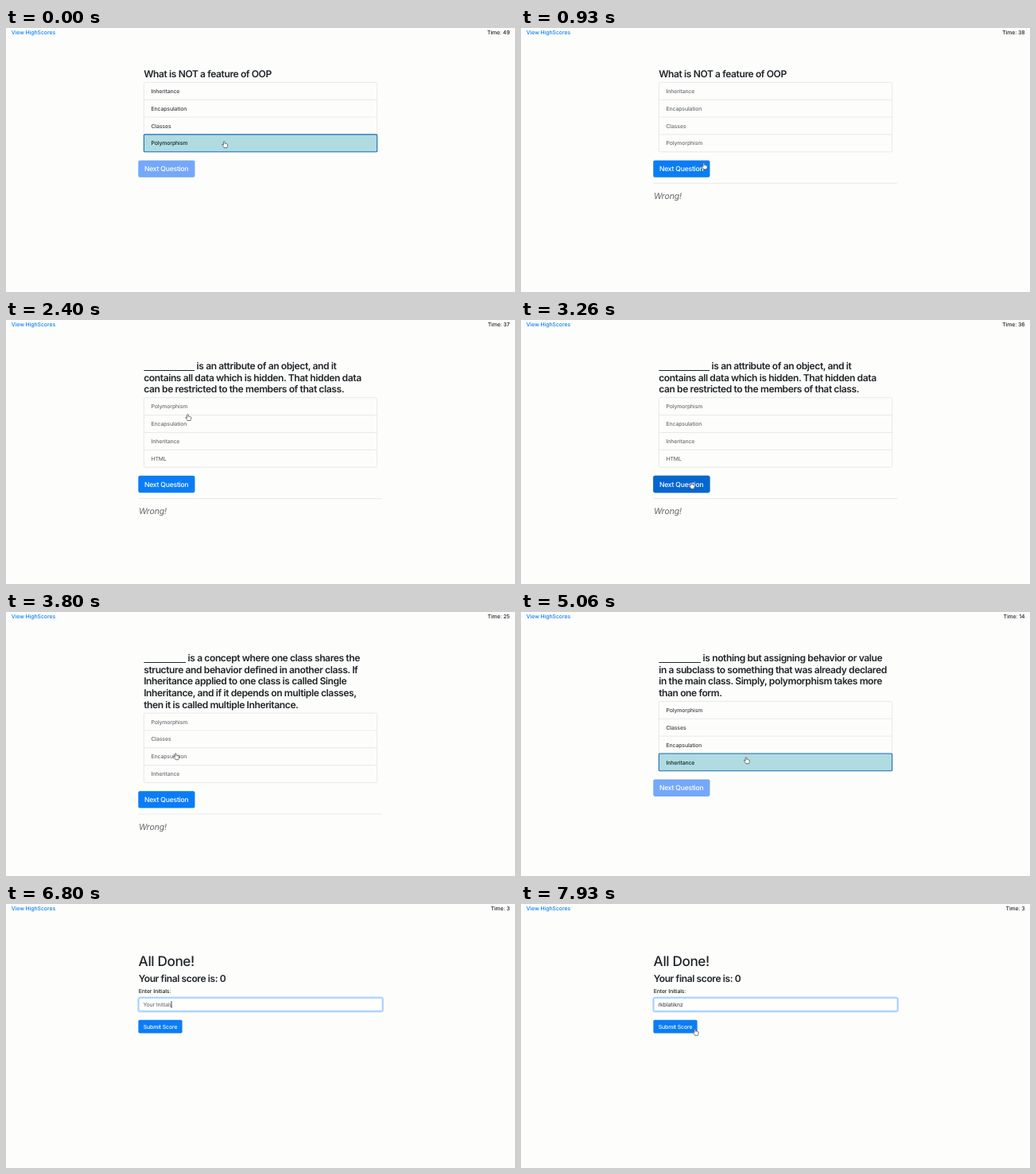
An HTML page for the animation above (8 s loop, 640 by 332 pixels).

```html
<!DOCTYPE html>
<html lang="en">
<head>
<meta charset="utf-8">
<title>Quiz</title>
<style>
  html, body { margin: 0; width: 100%; height: 100%; overflow: hidden; background: #fdfefc; }
  svg { display: block; width: 100vw; height: 100vh; }
  text {
    font: 500 6.9px Inter, Roboto, sans-serif; letter-spacing: -.016em; fill: #212529;
    white-space: pre; text-rendering: geometricPrecision;
  }
  .head { font-size: 12.1px; font-weight: 600; letter-spacing: -.035em; }
  .title { font-size: 17.25px; font-weight: 500; letter-spacing: -.025em; }
  .link { fill: #0a7df5; letter-spacing: -.01em; }
  .end { text-anchor: end; }
  .mid { text-anchor: middle; fill: #fff; }
  .big { font-size: 8.63px; letter-spacing: -.027em; }
  .wrong { font-size: 10.5px; font-weight: 400; font-style: italic; letter-spacing: -.012em; fill: #606468; }
  .line { stroke: #e2e3e2; stroke-width: .8; fill: none; }
  .option { fill: #6a6f74; }
  .answering .option { fill: #3c4146; }
  .answering .option.picked { fill: #14262a; }
  .pick { fill: #afdbe1; stroke: #1c6fb8; stroke-width: 1.1; }
  .btn { fill: #0a7df5; }
  .answering .btn { fill: #74a8f8; }
  .hover { fill: #0663cb; }
  .field { fill: #fff; stroke: #d0d5da; stroke-width: .8; }
  .focus .field { stroke: #80bdff; }
  .glow { fill: none; stroke: #bfdeff; stroke-width: 2.6; }
  .hint { fill: #6c757d; }
  .typed { fill: #495057; }
  .hand { fill: #fff; stroke: #4a4d50; stroke-width: .75; stroke-linejoin: round; }
  .beam { fill: none; stroke: #444; stroke-width: .7; }
</style>
</head>
<body>
<svg viewBox="0 0 640 332" preserveAspectRatio="none">
  <text class="link" x="6.8" y="8">View HighScores</text>
  <text id="time" class="end" x="633.4" y="8"></text>

  <g id="quiz">
    <g id="prompt"></g>
    <g id="panel">
      <rect class="line" x="173.4" y="68.3" width="293.2" height="87.5" rx="1.8"/>
      <path class="line" d="M173.4 90.2H466.6M173.4 112.05H466.6M173.4 133.9H466.6"/>
      <rect id="pick" class="pick" x="173.4" width="293.2" height="21.8" rx="1"/>
      <g id="options"></g>
      <rect class="btn" x="166.3" y="166.4" width="71.2" height="21.4" rx="2.1"/>
      <rect id="hover" class="hover" x="166.3" y="166.4" width="71.2" height="21.4" rx="2.1"/>
      <text class="mid big" x="201.7" y="180.2">Next Question</text>
      <g id="wrong">
        <path class="line" d="M166.8 195.2H473.2"/>
        <text class="wrong" x="167" y="215">Wrong!</text>
      </g>
    </g>
  </g>

  <g id="done">
    <text class="title" x="166.6" y="78.1">All Done!</text>
    <text class="head" x="166.7" y="97.7">Your final score is: 0</text>
    <text x="166.7" y="111.7">Enter Initials:</text>
    <rect id="glow" class="glow" x="166.5" y="117.7" width="307.2" height="17.4" rx="2.2"/>
    <rect class="field" x="167" y="118.2" width="306.2" height="16.4" rx="1.7"/>
    <text id="entry" x="172.4" y="129.2"></text>
    <rect class="btn" x="166.4" y="145.7" width="55.2" height="16.9" rx="1.8"/>
    <text class="mid" x="194" y="156.7">Submit Score</text>
  </g>

  <g id="pointer">
    <path id="hand" class="hand" d="M-.8 .8Q0-.5 .8 .8L.9 3.1Q1.6 2.5 2.2 3.3Q3 2.8 3.4 3.7Q4.4 3.5 4.4 4.6L4.2 6.2Q3.7 7.2 3.6 8.3H-.2Q-.6 7-1.6 6Q-3 4.4-2.5 3.9Q-1.8 3.6-.8 4.9Z"/>
    <path id="beam" class="beam" d="M-1.2-3.5H1.2M0-3.5V3.5M-1.2 3.5H1.2"/>
  </g>
</svg>
<script>
const LOOP = 8000, LINE = 14.7, ROW = 21.87;
const ui = {};
for (const el of document.querySelectorAll('[id]')) ui[el.id] = el;

// pick: [option, from, to]; hover: span of the button under the pointer
const questions = [
  { from: 0, blank: 0, pick: [3, 0, 60], hover: [1050, 2200],
    lines: ['What is NOT a feature of OOP'],
    options: ['Inheritance', 'Encapsulation', 'Classes', 'Polymorphism'] },
  { from: 2200, blank: 63.6, pick: [2, 2650, 2930], hover: [3130, 3420],
    lines: ['is an attribute of an object, and it',
      'contains all data which is hidden. That hidden data',
      'can be restricted to the members of that class.'],
    options: ['Polymorphism', 'Encapsulation', 'Inheritance', 'HTML'] },
  { from: 3420, blank: 52.6, pick: [2, 4060, 4330], hover: [4510, 4660],
    lines: ['is a concept where one class shares the',
      'structure and behavior defined in another class. If',
      'Inheritance applied to one class is called Single',
      'Inheritance, and if it depends on multiple classes,',
      'then it is called multiple Inheritance.'],
    options: ['Polymorphism', 'Classes', 'Encapsulation', 'Inheritance'] },
  { from: 4660, blank: 52.6, pick: [3, 4930, 5200], hover: [5570, 5690],
    lines: ['is nothing but assigning behavior or value',
      'in a subclass to something that was already declared',
      'in the main class. Simply, polymorphism takes more',
      'than one form.'],
    options: ['Polymorphism', 'Classes', 'Encapsulation', 'Inheritance'] }
];
const DONE = 5690, FOCUS = 6440, TYPING = 7000, KEY = 36, RETURN = 7730;
const initials = 'rkblatiknz';
const times = [49, 38, 37, 36, 25, 14, 3];

// pointer stops: time, x, y
const path = [
  [0, 274.3, 142.3], [400, 274.3, 142.3], [1160, 217.5, 177], [1800, 216.8, 176.6],
  [2200, 216.8, 176.6], [2400, 228.5, 118.2], [2620, 236, 148], [2930, 235, 150],
  [3220, 214, 204], [3440, 213, 204], [3720, 213.3, 177.4], [4330, 213.3, 177.4],
  [4570, 211, 232], [4680, 211, 232], [4920, 283, 182.4], [5400, 283, 182.4],
  [5640, 203.2, 225.8], [5930, 203.2, 225.8], [6360, 208, 126.5], [RETURN, 208, 126.5],
  [7930, 218.8, 157], [LOOP, 218.8, 157]
];

const within = (t, a, b) => t >= a && t < b;
const show = (el, on) => { el.style.display = on ? '' : 'none'; };

function pointerAt(t) {
  const i = path.findIndex((p, k) => k && t < p[0]);
  const [t0, x0, y0] = path[i - 1], [t1, x1, y1] = path[i];
  const u = (t - t0) / (t1 - t0), e = u * u * (3 - 2 * u);
  return [x0 + (x1 - x0) * e, y0 + (y1 - y0) * e];
}

let current = null;
function ask(q) {
  if (q === current) return;
  current = q;
  const blank = q.blank
    ? `<path d="M173.4 63.5h${q.blank}" stroke="#212529" stroke-width="1.1"/>` : '';
  ui.prompt.innerHTML = blank + q.lines.map((s, i) => {
    const x = 173.2 + (i === 0 && q.blank ? q.blank + 2.8 : 0);
    return `<text class="head" x="${x}" y="${61.9 + i * LINE}">${s}</text>`;
  }).join('');
  ui.options.innerHTML = q.options.map((s, i) =>
    `<text class="option${i === q.pick[0] ? ' picked' : ''}" x="182.4" y="${81.8 + i * ROW}">${s}</text>`
  ).join('');
  ui.panel.setAttribute('transform', `translate(0 ${(q.lines.length - 1) * LINE})`);
  ui.pick.setAttribute('y', 68.3 + q.pick[0] * ROW);
}

function drawQuiz(t) {
  const q = questions.filter(q => t >= q.from).pop();
  ask(q);
  const answering = within(t, q.pick[1], q.pick[2]);
  ui.panel.setAttribute('class', answering ? 'answering' : '');
  show(ui.pick, answering);
  show(ui.wrong, !answering);
  const over = within(t, ...q.hover);
  ui.hover.style.opacity = over ? Math.min(1, (t - q.hover[0]) / 150) : 0;
}

function drawDone(t) {
  const focus = t >= FOCUS;
  const count = t < TYPING ? 0 : Math.floor((t - TYPING) / KEY) + 1;
  ui.done.setAttribute('class', focus ? 'focus' : '');
  show(ui.glow, focus);
  ui.entry.setAttribute('class', count ? 'typed' : 'hint');
  ui.entry.textContent = count ? initials.slice(0, count) : 'Your Initials';
}

function draw(t) {
  const done = t >= DONE;
  show(ui.quiz, !done);
  show(ui.done, done);
  if (done) drawDone(t); else drawQuiz(t);

  const tick = Math.min(times.length - 1, Math.floor((t + 400) / 1000));
  ui.time.textContent = 'Time: ' + times[tick];

  const [x, y] = pointerAt(t);
  const beam = done && within(y, 118, 135);
  ui.pointer.setAttribute('transform', `translate(${x} ${y})`);
  show(ui.pointer, !within(t, TYPING, RETURN));
  show(ui.hand, !beam);
  show(ui.beam, beam);
}

const start = performance.now();
function frame() {
  draw((performance.now() - start) % LOOP);
  requestAnimationFrame(frame);
}
frame();
</script>
</body>
</html>
```
